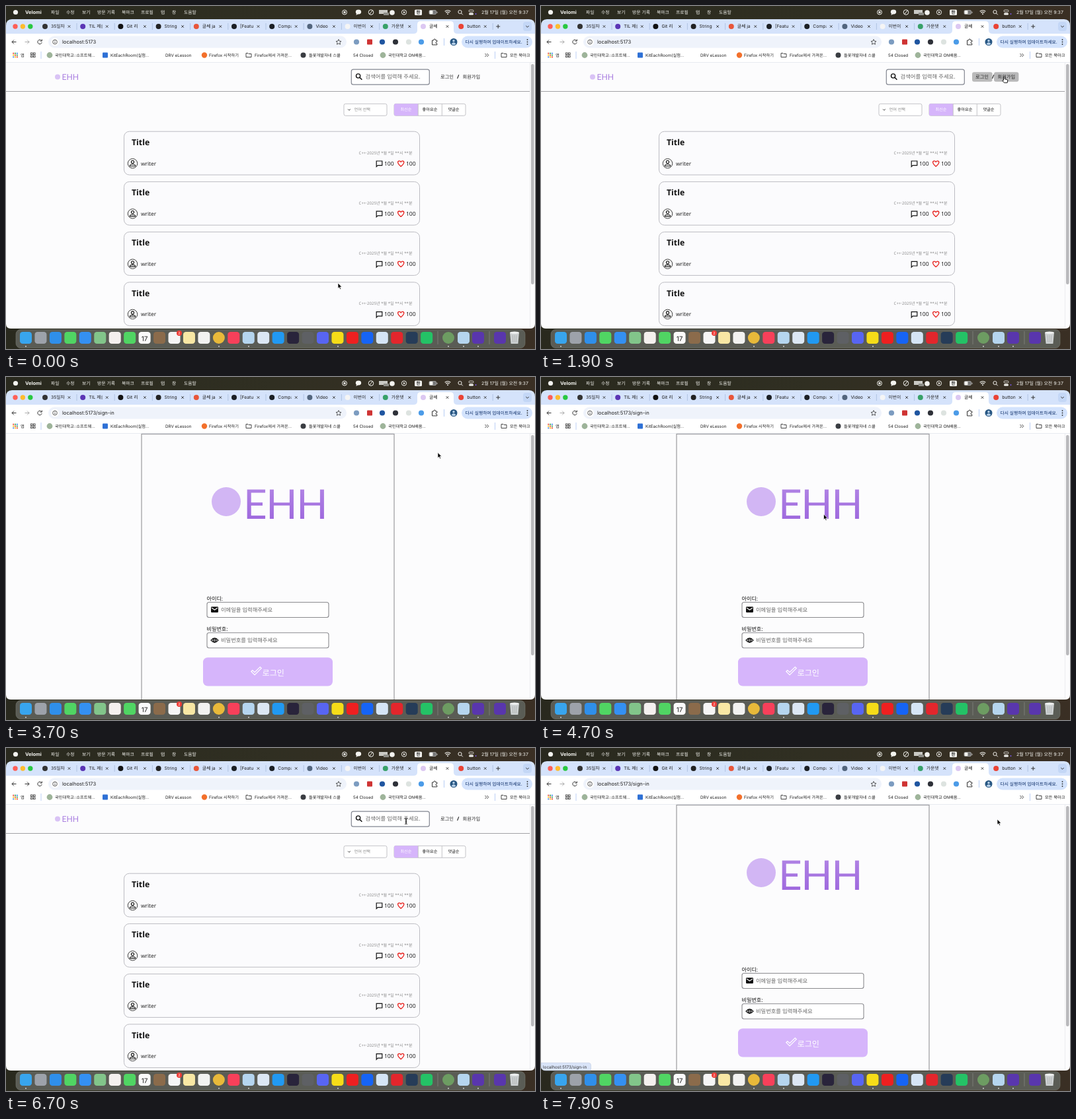
Write an HTML page that moves like this. It is 800x520 px and loops after 8000 ms.

```html
<!DOCTYPE html>
<html lang="ko">
<head>
<meta charset="utf-8">
<title>Browser demo</title>
<style>
html, body { margin: 0; width: 100%; height: 100%; overflow: hidden; background: #2a2a20 }
svg { display: block; width: 800px; height: 520px }
text { white-space: pre; text-rendering: geometricPrecision; font-family: Inter, 'Noto Sans CJK KR', 'Noto Sans CJK', sans-serif }
.page text { font-family: 'Noto Sans', 'Noto Sans CJK KR', 'Noto Sans CJK', sans-serif }
.page .mark { font-family: Lato, sans-serif }
</style>
</head>
<body>
<svg id="stage" viewBox="0 0 800 520"></svg>
<script>
const text = (x, y, s, size, fill = '#1f1f1f', more = '') =>
  `<text x="${x}" y="${y}" font-size="${size}" fill="${fill}" ${more}>${s}</text>`;
const rect = (x, y, w, h, fill, r = 0, more = '') =>
  `<rect x="${x}" y="${y}" width="${w}" height="${h}" rx="${r}" fill="${fill}" ${more}/>`;
const disc = (x, y, r, fill, more = '') => `<circle cx="${x}" cy="${y}" r="${r}" fill="${fill}" ${more}/>`;
const line = (d, color = '#444', w = 1, more = '') =>
  `<path d="${d}" fill="none" stroke="${color}" stroke-width="${w}" ${more}/>`;
const shape = (d, fill, more = '') => `<path d="${d}" fill="${fill}" ${more}/>`;
const at = (x, y, s) => `<g transform="translate(${x} ${y})">${s}</g>`;
const outline = (color, w = 1) => `stroke="${color}" stroke-width="${w}"`;
const bold = 'font-weight="600"', mid = 'text-anchor="middle"', end = 'text-anchor="end"';

const folder = (x, y) => line(`M${x - 4} ${y - 3}h3l1 1h4v5h-8z`, '#333', .9);

function menuBar() {
  const items = [[68, '파일'], [91, '수정'], [115, '보기'], [138, '방문 기록'], [175, '북마크'],
    [204, '프로필'], [234, '탭'], [251, '창'], [269, '도움말']];
  const w = '#f4f4f0';
  return rect(0, 0, 800, 24, 'url(#wall)') + disc(14.5, 9.5, 3.6, w) +
    text(29, 12.2, 'Velomi', 7.4, w, 'font-weight="700"') +
    items.map(([x, s]) => text(x, 12, s, 6.8, w)).join('') +
    disc(512, 9.5, 3.5, 'none', outline(w)) + rect(510.5, 8, 3, 3, w, .6) +
    `<ellipse cx="533" cy="9" rx="4.2" ry="3.4" fill="${w}"/>` + shape('M530 11l-.5 3 3-2z', w) +
    disc(552, 9.5, 3.8, 'none', outline(w)) + line('M550 12l4-5', w) +
    rect(564, 6, 13, 6, '#c9c9c4') + rect(571, 10, 8, 4, '#8e8e88') + disc(584, 10, 3.8, w) +
    disc(602, 9.5, 3.6, 'none', outline(w)) + shape('M601 7.7l3 1.8-3 1.8z', w) +
    rect(618, 5.5, 11, 8.5, w, 1.5) + text(623.5, 12.2, '한', 6.5, '#222', mid + ' ' + bold) +
    rect(640, 6.5, 10.5, 6, '#777', 1.6, outline('#bbb', .7)) + rect(640.5, 7, 5, 5, w, 1) + rect(651.5, 8.5, 1, 2.5, '#bbb') +
    line('M663.7 8.3q4.3-3.6 8.6 0M665.3 10.2q2.7-2.2 5.4 0', w, 1.2) + disc(668, 12, 1, w) +
    disc(686.5, 9, 2.6, 'none', outline(w)) + line('M688.5 11l2.3 2.3', w) +
    rect(700, 6, 7, 3, 'none', 1.5, outline(w, .8)) + rect(700, 10.5, 7, 3, w, 1.5) + disc(710.5, 12, 1, '#7554e8') +
    text(719, 12, '2월 17일 (월) 오전 9:37', 7, w);
}

function tabs() {
  const list = [['35일차', '#333'], ['TIL 제출', '#5b35b5'], ['Git 리', '#111'], ['String', '#222'], ['글쎄 ja', '#e8563a'],
    ['[Featu', '#1b1f24'], ['Compa', '#1b1f24'], ['Video', '#52657d'], ['이번이', '#f5f5f5'], ['가운뎃', '#38a169'],
    ['글쎄', '#dcc8f2'], ['button', '#ea4335']];
  let s = shape('M0 42V30q0-10 9-10H791q9 0 9 10v12z', '#d5e3fb') +
    shape('M616 42q6 0 6-5V28q0-5 5-5h45q5 0 5 5v9q0 5 6 5z', '#fff') +
    ['#ff5f57', '#febc2e', '#28c840'].map((c, i) => disc(14 + i * 11.4, 31, 3.7, c)).join('');
  list.forEach(([name, color], i) => {
    const x = 59 + 57.2 * i, e = x + 36.5;
    s += disc(x, 31, 4, color) +
      `<svg x="${x + 9}" y="22" width="20.5" height="18">${text(0, 11.3, name, 6.8)}</svg>` +
      line(`M${e - 1.8} 29.2l3.6 3.6m0-3.6l-3.6 3.6`, '#333', .9);
    if (i < 9 || i > 10) s += line(`M${x + 48} 26v10`, '#a9bddd', .8);
  });
  return s + line('M741.2 31h6M744.2 28v6', '#333') + rect(782, 24, 13, 14, '#c4d7f6', 4) + line('M786.3 30l2.2 2.2 2.2-2.2', '#333');
}

function toolbar() {
  const extensions = [[530, '#7c9cc0'], [550, '#cf3434'], [569, '#1f55a0'], [589, '#2d3038'], [609, '#dde3e0'], [628, '#4b9be8']];
  return rect(0, 42, 800, 44, '#fff') + line('M15.5 54.5h-6.5m3-3l-3 3 3 3', '#333') +
    `<g id="forward">${line('M28.5 54.5h6.5m-3-3l3 3-3 3', '#333')}</g>` +
    line('M53.6 52.5a3.2 3.2 0 1 0 .6 2.7M54.3 50.5v2.6h-2.6', '#333') +
    rect(64, 45.5, 451, 18, '#eff3fb', 9) + disc(74, 54.5, 6, '#fff') +
    disc(74, 54.5, 3.3, 'none', outline('#333', .8)) + line('M74 54v2.2M74 52.4v.8', '#333', .9) +
    text(85, 57.3, '', 7.6, '#1f1f1f', 'id="address"') +
    line('M503 50.6l1.2 2.6 2.8.3-2.1 1.9.6 2.8-2.5-1.4-2.5 1.4.6-2.8-2.1-1.9 2.8-.3z', '#333', .8) +
    extensions.map(([x, c]) => x == 550 ? rect(546, 50.5, 8, 8, c, 1) : disc(x, 54.5, 4.1, c)).join('') +
    line('M644.5 52h2.3q0-2 1.4-2t1.4 2h2.2v2.3q-2 0-2 1.3t2 1.3v2h-7.3z', '#333') + line('M662.5 49v11', '#b7cdf4') +
    disc(677, 54.5, 5.5, '#285783') + disc(677, 52.8, 1.7, '#b9d2ea') + shape('M673.5 57.6q3.5-4.5 7 0-3.5 3-7 0z', '#b9d2ea') +
    rect(689, 45.5, 107, 18, '#d3e3fd', 9) + text(694.5, 57, '다시 실행하여 업데이트하세요.', 6.75, '#0b2c66', 'font-weight="500"') +
    [51, 54.5, 58].map(y => disc(788.5, y, .9, '#333')).join('');
}

function bookmarks() {
  const items = [[22, '앱'], [74, '국민대학교::소프트웨...'], [158, 'KitEachRoom(실험...'], [241, 'DRV eLesson'],
    [307, 'Firefox 시작하기'], [376, 'Firefox에서 가져온...'], [458, '들꽃개발자네 스쿨'], [525, '54 Closed'],
    [578, '국민대학교 ON배움...'], [762, '모든 북마크']];
  let s = '';
  for (let i = 0; i < 9; i++)
    s += rect(10.3 + i % 3 * 2.8, 70.8 + (i / 3 | 0) * 2.8, 1.9, 1.9, ['#ea4335', '#34a853', '#4285f4', '#fbbc04'][i % 4]);
  for (let i = 0; i < 4; i++)
    s += rect(37.5 + i % 2 * 4, 71 + (i >> 1) * 4, 2.6, 2.6, 'none', 0, outline('#333', .8));
  return s + line('M53 69v11M739.5 69v11', '#bcd0f5') + disc(66, 74.5, 4.4, '#9eb49a') + rect(146, 70.5, 8, 8, '#2f71d6', 1) +
    disc(300, 74.5, 4.2, '#f3702b') + folder(367, 74.5) + disc(449.5, 74.5, 4, '#3a3d42') + disc(570, 74.5, 4.4, '#9eb49a') +
    line('M724.5 72l2.2 2.5-2.2 2.5m3-5l2.2 2.5-2.2 2.5', '#333', .9) + folder(753, 74.5) +
    items.map(([x, t]) => text(x, 76.8, t, 6.25)).join('') + line('M0 85.5h800', '#e3e6ec', .8);
}

function card(y) {
  const icons = line('M560.2 235h8.6v6.6h-6.6l-2 2z', '#111', 1.2) +
    line('M597.2 243.2q-4.6-4-4.6-6.2 0-2.2 2.2-2.2 1.5 0 2.4 1.5.9-1.5 2.4-1.5 2.2 0 2.2 2.2 0 2.2-4.6 6.2z', '#e8201c', 1.3);
  return at(0, y - 190, rect(178.5, 190.2, 447, 65.8, '#fbfbfd', 8, outline('#bcbcc2')) +
    text(190, 211, 'Title', 12.3, '#111', bold) +
    text(614.5, 224.6, 'C++·2025년 *월 *일 **시 **분', 6.1, '#8c8c8c', end) +
    disc(191.5, 238.7, 7.2, '#fff', outline('#222', .9)) + disc(191.5, 236.4, 2.1, 'none', outline('#111', 1.1)) +
    line('M187.4 242.7v-.7q0-2 4.1-2t4.1 2v.7z', '#111', 1.1) + text(204, 241.6, 'writer', 8.3, '#222') +
    icons + text(572, 241.7, '100', 8.5, '#222') + text(605, 241.7, '100', 8.5, '#222'));
}

function home() {
  return disc(78, 107.5, 4, '#d9c3f5') + text(84.5, 112, 'EHH', 12.2, '#a97ee0', 'class="mark"') +
    line('M0 129.5h792', '#a2a2a6') +
    rect(522.3, 96.2, 118, 23, '#fff', 3, outline('#838791', 1.2)) +
    disc(532.6, 106, 3.1, 'none', outline('#111', 1.4)) + line('M534.8 108.2l3.6 3.6', '#111', 1.6) +
    text(543.5, 110.4, '검색어를 입력해 주세요.', 8.3, '#666') +
    rect(652, 100.3, 30.6, 14.4, '#777', 3, 'id="login"') + rect(685, 100.3, 37.4, 14.4, '#777', 3, 'id="signup"') +
    text(657, 109.6, '로그인', 7.25, '#222') + text(683.7, 110, '/', 8, '#111', mid + ' ' + bold) + text(690.5, 109.6, '회원가입', 7.25, '#222') +
    rect(511, 148.3, 65, 18, '#fff', 2.5, outline('#c3c3c7')) + line('M517 156.3l1.9 1.9 1.9-1.9', '#444') +
    text(526.5, 159.3, '언어 선택', 6.2, '#858585') +
    rect(587, 148.3, 108, 18, '#fff', 2.5, outline('#c3c3c7')) + shape('M623 148.3v18h-34q-2 0-2-2v-14q0-2 2-2z', '#d6b5fb') +
    line('M623.3 148.3v18M659.3 148.3v18', '#c3c3c7') +
    text(605, 159.3, '최신순', 6.2, '#fff', mid) + text(641, 159.3, '좋아요순', 6.2, '#111', mid + ' font-weight="500"') +
    text(677, 159.3, '댓글순', 6.2, '#111', mid + ' font-weight="500"') +
    [0, 1, 2, 3].map(i => card(190 + 76.2 * i)).join('');
}

function signIn() {
  const field = (y, label, hint) => text(303.5, y - 3, label, 8.1, '#111', 'font-weight="500"') +
    rect(304, y, 184, 23, '#fff', 3, outline('#8a8a8e', 1.1)) + text(325, y + 14.2, hint, 8.25, '#666');
  return rect(205, 86.5, 382, 420, 'none', 0, outline('#9a9a9e', 1.2)) +
    disc(333, 189, 22, '#d2b6f4') + text(359, 214.5, 'EHH', 62, 'url(#ink)', 'class="mark" letter-spacing="-1.5"') +
    field(341.5, '아이디:', '이메일을 입력해주세요') + field(387.7, '비밀번호:', '비밀번호를 입력해주세요') +
    rect(310, 348.3, 11, 8.6, '#111', 1.2) + line('M311 350l4.5 3 4.5-3', '#fff', 1.1) +
    line('M310 399.2q5.5-6.5 11 0-5.5 6.5-11 0z', '#111', 1.2) + disc(315.5, 399.2, 2.3, 'none', outline('#111', 1.4)) + disc(315.5, 399.2, .9, '#111') +
    rect(298, 425.2, 196, 43.3, '#d6b5fb', 7) +
    line('M370.8 446.5l2-2 3.3 3.2 8.2-8.2 2 2-10.2 10.2z', '#fff', 1.1) + text(387.5, 452.8, '로그인', 12.1, '#fff');
}

function dock() {
  const colors = ['#38a5ee', '#9da2aa', '#2f8fea', '#50d563', '#3490f2', '#82c58a', '#f4f0ee', '#50d563', '#fafafa', '#8b6b4b',
    '#f5f5f5', '#f8e7a4', '#f2f2f0', '#e8b93a', '#f7405a', '#b5d5ee', '#dce7f3', '#2199f2', '#29243b', '#5e6064',
    '#5865f2', '#f5dc18', '#ee2020', '#1664f5', '#d5e5f5', '#e3262c', '#263c58', '#24c266'];
  const extra = [[669, '#6d9c62'], [692, '#b5d5ee'], [714, '#5936ad'], [747, '#5936ad']];
  const icons = colors.map((c, i) => [30 + 22.45 * i, c]).concat(extra);
  return rect(0, 480, 800, 40, 'url(#wall)') + rect(15, 490.5, 770, 28, '#5a5c55', 7, outline('#777970', .6)) +
    icons.map(([x, c], i) => i == 13 || i == 28 ? disc(x, 503, 9, c) : rect(x - 9, 494, 18, 18, c, 4.2)).join('') +
    text(209.6, 508, '17', 10, '#222', mid) + disc(262, 496, 4, '#ee3a35') + text(262, 498, '2', 5.5, '#fff', mid) +
    line('M653 493v20M731 493v20', '#85877f', .8) + shape('M762 495h14l-1.6 17h-10.8z', '#cdd1d2') +
    `<ellipse cx="769" cy="495.3" rx="7" ry="1.8" fill="#eef0f0"/>` + line('M766 499l.7 11M769 499v11M772 499l-.7 11', '#a9adae', .7) +
    [30, 322, 367, 502, 669, 692, 714].map(x => disc(x, 516, .9, '#ddd')).join('');
}

const stage = document.getElementById('stage');
stage.innerHTML = `<defs>
  <linearGradient id="wall"><stop stop-color="#29291e"/><stop offset=".5" stop-color="#302f22"/><stop offset="1" stop-color="#3a2f24"/></linearGradient>
  <linearGradient id="ink" x2="0" y2="1"><stop stop-color="#b58ae6"/><stop offset="1" stop-color="#9a62dc"/></linearGradient>
  </defs>` + dock() + menuBar() + shape('M0 40H800V482q0 7-7 7H7q-7 0-7-7z', '#fcfcfd') + tabs() + toolbar() + bookmarks() +
  `<svg class="page" width="800" height="489"><g id="home">${home()}</g><g id="signIn">${signIn()}</g></svg>` +
  line('M792.5 86v403', '#e9e9eb', .8) + rect(794, 88, 4.6, 334, '#b9b9bc', 2.3) +
  `<g id="status">${shape('M0 477.3h72q3.5 0 3.5 3.5v8.2H7q-7 0-7-7z', '#d9e4f8', outline('#b9c5da', .5))}${text(3, 485.5, 'localhost:5173/sign-in', 6.4, '#333')}</g>` +
  `<g id="cursor">
    <g>${shape('M0 0v8.3l1.9-1.7 1.3 2.9 1.4-.6-1.3-2.9h2.6z', '#000', outline('#fff', .7))}</g>
    <g>${shape('M-1 5V.7Q-.2-.7.8.7v3l3.5.8q1.1.3 1 1.5L4.7 9.3H0L-2.9 6q.6-1.3 1.9-.3z', '#fff', outline('#000', .9))}</g>
    <g>${line('M-1.8-4.5q1.8 0 1.8 1.2v6.6q0 1.2 1.8 1.2M1.8-4.5Q0-4.5 0-3.3v6.6q0 1.2-1.8 1.2M-1 1h2', '#111', .9)}</g>
  </g>`;

const el = id => document.getElementById(id);
const show = (node, on) => node.setAttribute('visibility', on ? 'visible' : 'hidden');
const clamp = v => Math.max(0, Math.min(1, v));
const between = (t, a, b) => t >= a && t < b;
const fade = (t, on, off) => clamp((t - on) / 300) - clamp((t - off) / 300);

// Pointer stops: time, x, y
const path = [[0, 502, 420], [500, 502, 420], [1500, 666, 109], [1700, 672, 107], [1900, 700.5, 107], [2400, 701, 108],
  [2700, 673, 108], [2900, 671, 107], [3500, 671, 107], [4700, 427.5, 208], [5300, 12, 54], [5500, 12, 54],
  [5800, 111, 109.5], [6700, 605, 111], [7300, 668, 108], [7600, 670, 108], [7900, 690, 108], [8000, 690, 108]];

function pointer(t) {
  const i = path.findIndex(p => p[0] > t), [a, ax, ay] = path[i - 1], [b, bx, by] = path[i];
  const k = (t - a) / (b - a), e = k * k * (3 - 2 * k);
  return [ax + (bx - ax) * e, ay + (by - ay) * e];
}

function draw(now) {
  const t = Math.floor(now % 8000 / 100) * 100;
  const signed = between(t, 3500, 5500) || t >= 7600;
  const [x, y] = pointer(t);
  show(el('home'), !signed);
  show(el('signIn'), signed);
  show(el('status'), between(t, 2700, 3600) || t >= 7300);
  el('address').textContent = 'localhost:5173' + (signed ? '/sign-in' : '');
  el('forward').setAttribute('opacity', between(t, 5500, 7600) ? 1 : .4);
  el('login').setAttribute('opacity', fade(t, 1450, 1750) + fade(t, 2550, 3600) + fade(t, 7250, 8000));
  el('signup').setAttribute('opacity', fade(t, 1750, 2500));
  const kind = signed ? 0 : between(y, 100, 115) && between(x, 652, 723) ? 1 : between(y, 96, 120) && between(x, 522, 641) ? 2 : 0;
  el('cursor').setAttribute('transform', `translate(${x} ${y})`);
  [...el('cursor').children].forEach((g, i) => show(g, i == kind));
  requestAnimationFrame(draw);
}
requestAnimationFrame(draw);
</script>
</body>
</html>
```
